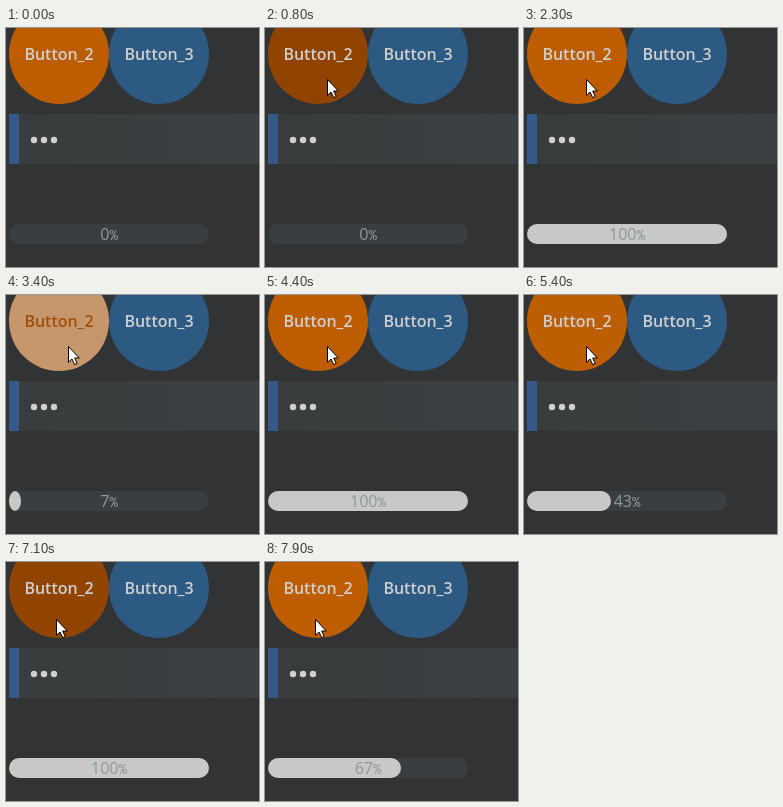
An HTML page for the animation above (8000 ms loop, 253 by 239 pixels).

```html
<!DOCTYPE html>
<html lang="en">
<head>
<meta charset="utf-8">
<title>Buttons and progress bar</title>
<style>
  html, body { margin: 0; width: 100%; height: 100%; overflow: hidden; background: #313335; }
  svg { display: block; width: 100vw; height: 100vh; }
  text { text-anchor: middle; font: 16px "Open Sans", "Noto Sans", sans-serif; }
  .label { font-weight: 600; fill: #d0d0d0; }
  #percent { fill: #8f9799; }
  #percent .sign { font: 14px "Noto Sans Mono", monospace; }
</style>
</head>
<body>
<svg viewBox="0 0 253 239">
  <defs>
    <linearGradient id="rowFill">
      <stop offset="0" stop-color="#393c3d"/>
      <stop offset="1" stop-color="#3d4042"/>
    </linearGradient>
  </defs>
  <rect width="253" height="239" fill="#313335"/>
  <circle id="button" cx="53" cy="26" r="50"/>
  <text id="label" class="label" x="53" y="32">Button_2</text>
  <circle cx="153" cy="26" r="50" fill="#2c5a82"/>
  <text class="label" x="153" y="32">Button_3</text>

  <rect x="3" y="86" width="250" height="50" fill="url(#rowFill)"/>
  <rect id="rowHover" x="3" y="86" width="250" height="50" fill="#fff"/>
  <rect x="3" y="86" width="10" height="50" fill="#36598c"/>
  <g fill="#d0d0d0">
    <circle cx="28" cy="112" r="3.2"/>
    <circle cx="38" cy="112" r="3.2"/>
    <circle cx="48" cy="112" r="3.2"/>
  </g>

  <rect x="3" y="196" width="200" height="20" rx="10" fill="#3b3e40"/>
  <rect id="bar" x="3" y="196" height="20" ry="10" fill="#c8c8c8"/>
  <text id="percent" x="103" y="212"><tspan id="digits"></tspan><tspan class="sign">%</tspan></text>

  <path id="cursor" d="M.5 .5V16.3L4 13L6.7 18.6L9.2 17.5L6.7 12H11.3Z" fill="#fff" stroke="#000"/>
</svg>
<script>
const LOOP = 8000, STEP = 100;
const CLICKS = [1298, 3338, 4978, 7235];
const NORMAL = [189, 93, 0], HOVER = [145, 68, 0], FLASH = [198, 151, 108];
const TEXT = [208, 208, 208], FLASH_TEXT = [160, 80, 12];

// Each path: [time, x, y] stops, followed by the time the pointer is gone.
const PATHS = [
  { stops: [[200, 229, 83], [300, 190, 81], [400, 141, 78], [500, 100, 67], [600, 76, 57],
            [700, 65, 52], [800, 62, 51], [5700, 62, 51], [5800, 78, 53], [5900, 130, 70],
            [6000, 185, 78], [6100, 234, 80]], end: 6200 },
  { stops: [[6700, 243, 114], [6800, 190, 93], [6900, 108, 72], [7000, 62, 60], [7100, 50, 57]], end: LOOP }
];

const $ = id => document.getElementById(id);
const clamp = v => Math.min(1, Math.max(0, v));
const lerp = (a, b, k) => a + (b - a) * k;
const mix = (a, b, k) => a.map((v, i) => lerp(v, b[i], k));
const rgb = c => `rgb(${c.map(Math.round)})`;
const set = (id, attrs) => {
  for (const name in attrs) $(id).setAttribute(name, attrs[name]);
};

function pointerAt(t) {
  const path = PATHS.find(p => t >= p.stops[0][0] && t < p.end);
  if (!path) return null;
  const next = path.stops.findIndex(s => s[0] > t);
  if (next < 0) return path.stops.at(-1).slice(1);
  const a = path.stops[next - 1], b = path.stops[next];
  const k = (t - a[0]) / (b[0] - a[0]);
  return [lerp(a[1], b[1], k), lerp(a[2], b[2], k)];
}

function hoverAt(t) {
  if (t < CLICKS[0]) return clamp((t - 450) / 300);
  if (t > 6700 && t < CLICKS[3]) return clamp((t - 6850) / 250);
  return 0;
}

function render(t) {
  const click = CLICKS.findLast(c => c <= t);
  const age = click === undefined ? -1 : t - click;
  const progress = clamp(age / 1000) * 100;
  const flash = age < 0 ? 0 : Math.exp(-Math.max(0, age - 65) / 90);

  set("button", { fill: rgb(mix(mix(NORMAL, HOVER, hoverAt(t)), FLASH, flash)) });
  $("label").style.fill = rgb(mix(TEXT, FLASH_TEXT, flash));

  const width = Math.floor(progress * 2);
  set("bar", { width, rx: Math.min(10, width / 2) });
  $("digits").textContent = Math.ceil(progress);

  set("rowHover", { opacity: t >= 6700 && t < 6900 ? 0.04 : 0 });

  const pointer = pointerAt(t);
  set("cursor", pointer
    ? { visibility: "visible", transform: `translate(${pointer.map(Math.round)})` }
    : { visibility: "hidden" });
}

const start = performance.now();
function tick() {
  const t = (performance.now() - start) % LOOP;
  render(Math.floor(t / STEP) * STEP);
  requestAnimationFrame(tick);
}
tick();
</script>
</body>
</html>
```
